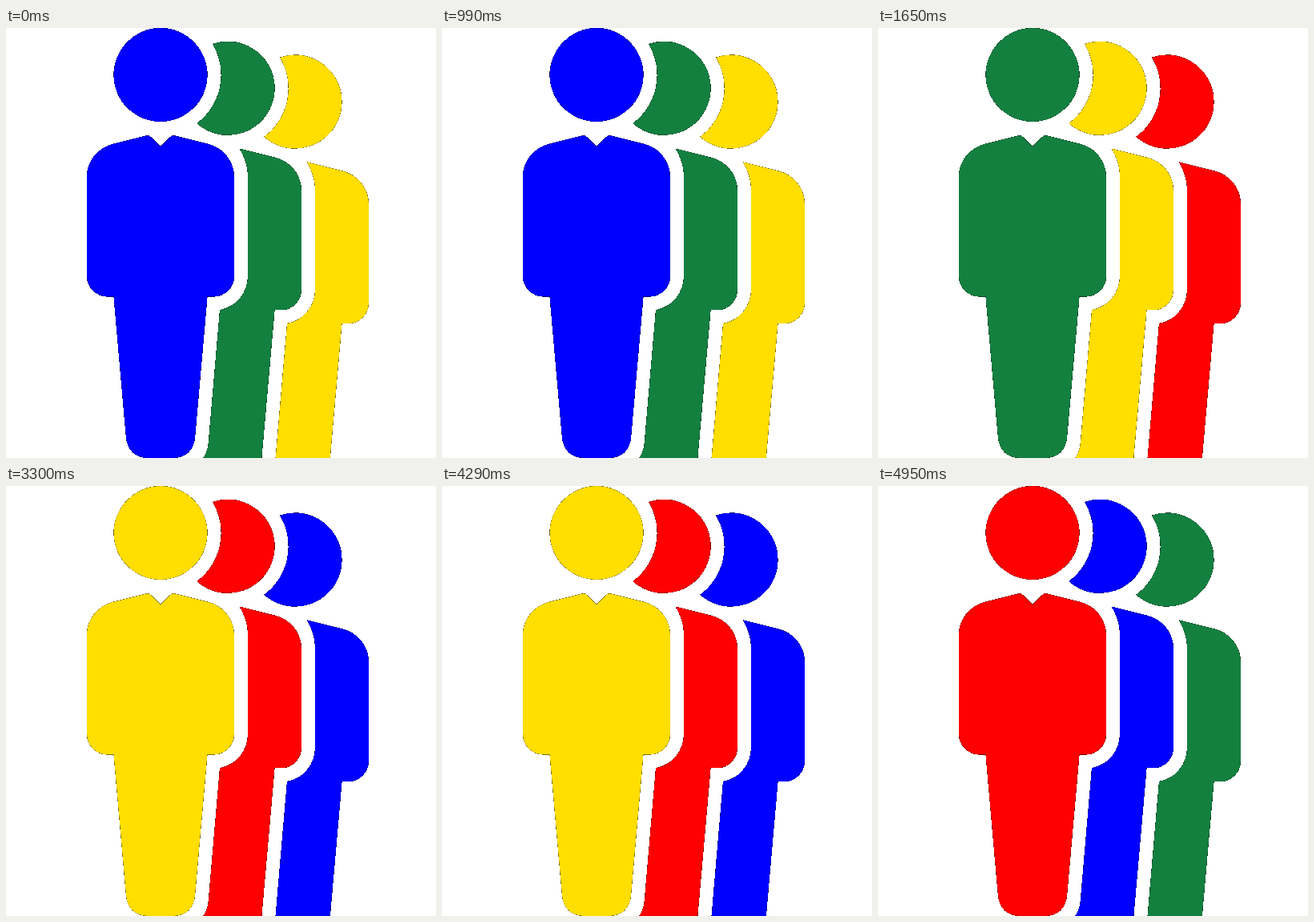
Animation, 537 px wide and 537 px high, one loop 6600 ms. Source, as an HTML page:

```html
<!DOCTYPE html>
<html lang="en">
<head>
<meta charset="utf-8">
<title>Three figures</title>
<style>
  html, body { margin: 0; width: 100%; height: 100%; overflow: hidden; background: #fff; }
  svg { display: block; width: 100%; height: 100%; }
</style>
</head>
<body>
<svg viewBox="0 0 537 537">
  <defs>
    <!-- Hard silhouette with darkened edge pixels -->
    <filter id="edge" filterUnits="userSpaceOnUse" x="0" y="0" width="537" height="537" color-interpolation-filters="sRGB">
      <feComponentTransfer in="SourceAlpha" result="mask">
        <feFuncA type="discrete" tableValues="0 1 1"/>
      </feComponentTransfer>
      <feComposite in="SourceGraphic" in2="mask" operator="in" result="paint"/>
      <feMerge><feMergeNode in="mask"/><feMergeNode in="paint"/></feMerge>
    </filter>
    <g id="back">
      <path d="M258 20 A58.5 58.5 0 1 1 238.2 119 A75 75 0 0 0 258 20Z"/>
      <path d="M291.5 150.5 L337 162 C356 167 369 184 369 203 V327 A25.5 25.5 0 0 1 343.5 352.3
        H335.5 L318.6 545 H240 L246 537 Q252 530 253 516 L267 352.3 A43 43 0 0 0 302 310 V186 C302 173 298 161 291.5 150.5Z"/>
    </g>
  </defs>
  <g filter="url(#edge)">
    <g class="person">
      <circle cx="193" cy="58.5" r="58.5"/>
      <path d="M193 148 L181 136 Q178.500 133.500 175 134.500 L133 145 C114 150 101 167 101 186 V310
        A25.5 25.5 0 0 0 126.5 335.500 H134.500 L150 512 Q152.500 535 176 537 H210 Q233.500 535 236 512
        L251.500 335.500 H259.500 A25.5 25.5 0 0 0 285 310 V186 C285 167 272 150 253 145
        L211 134.500 Q207.500 133.500 205 136Z"/>
    </g>
    <use class="person" href="#back"/>
    <use class="person" href="#back" x="84" y="16.8"/>
  </g>
</svg>
<script>
  const colors = ["#0000ff", "#148040", "#ffde00", "#ff0000"];
  const hold = 1650;
  const people = document.querySelectorAll(".person");
  const start = performance.now();

  function draw(time) {
    const step = Math.floor(time / hold) % colors.length;
    people.forEach((person, i) => {
      person.setAttribute("fill", colors[(step + i) % colors.length]);
    });
  }

  function tick() {
    draw(performance.now() - start);
    requestAnimationFrame(tick);
  }
  tick();
</script>
</body>
</html>
```
